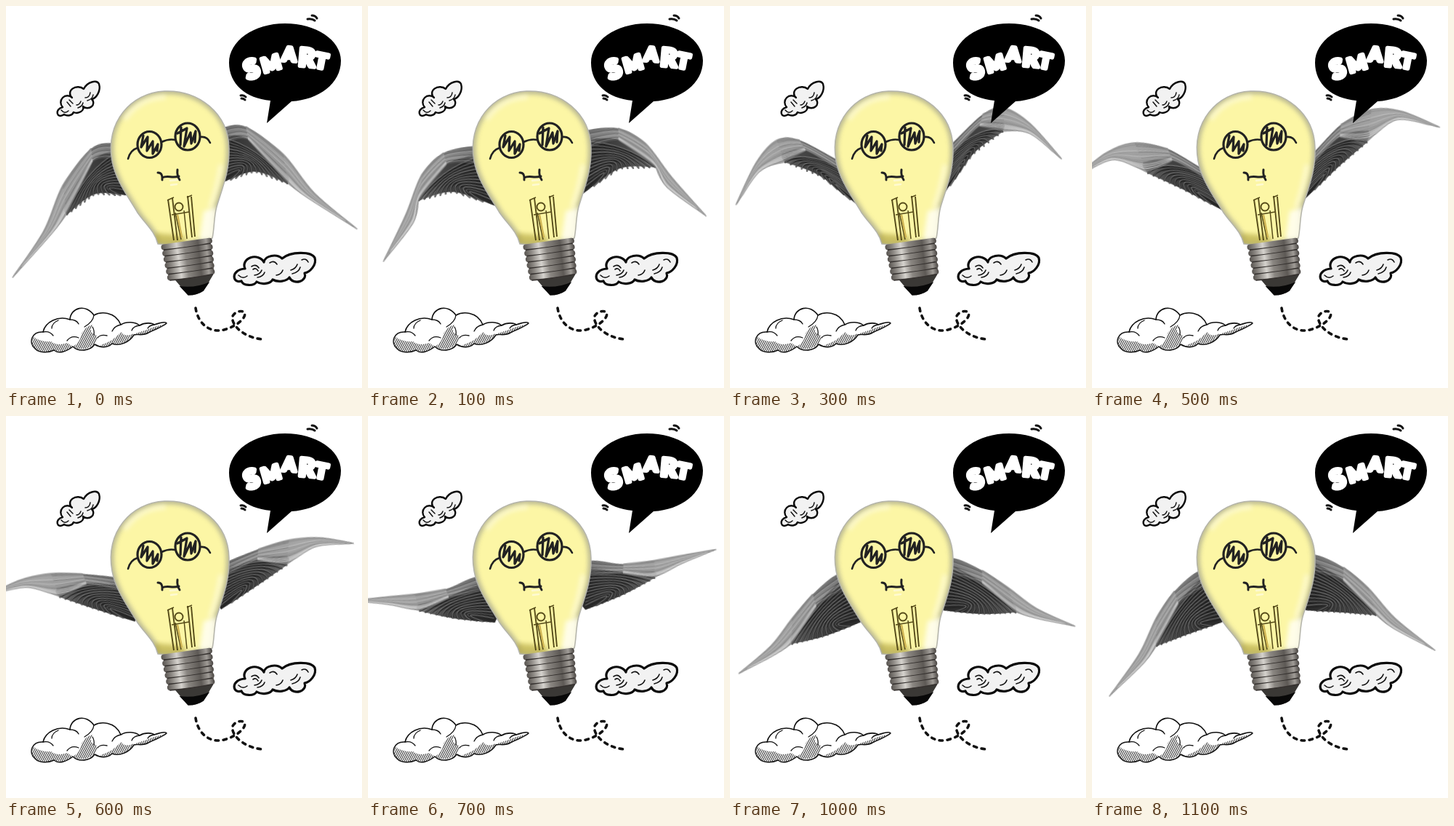
An HTML page that plays this animation: 490x525 px, repeating every 1.2 s.

```html
<!DOCTYPE html>
<html lang="en">
<head>
<meta charset="utf-8">
<title>Smart bulb</title>
<style>
  html, body { margin: 0; width: 100%; height: 100%; overflow: hidden; background: #fff; }
  svg { display: block; width: 490px; height: 525px; overflow: hidden; }
  .ink { fill: none; stroke: #111; stroke-linecap: round; stroke-linejoin: round; }
  .puff { fill: #f2f2f2; stroke: #0a0a0a; stroke-linejoin: round; }
  .word { font-family: Lato, "Open Sans", sans-serif; font-weight: 900;
          fill: #fff; stroke: #fff; stroke-width: 5.5; stroke-linejoin: round; }
  #strip { animation: flap 1.2s steps(12) infinite; }
  @keyframes flap { to { transform: translateX(-7200px); } }
</style>
</head>
<body>
<svg viewBox="0 0 490 525">
  <defs>
    <linearGradient id="plume" gradientUnits="userSpaceOnUse" x1="75" y1="0" x2="245" y2="0">
      <stop offset="0" stop-color="#6c6c6c"/><stop offset=".4" stop-color="#9c9c9c"/>
      <stop offset="1" stop-color="#c2c2c2"/>
    </linearGradient>
    <linearGradient id="shade" gradientUnits="userSpaceOnUse" x1="70" y1="0" x2="165" y2="0">
      <stop offset="0" stop-color="#2c2c2c"/><stop offset=".6" stop-color="#464646"/>
      <stop offset="1" stop-color="#808080"/>
    </linearGradient>
    <linearGradient id="metal">
      <stop offset="0" stop-color="#57534f"/><stop offset=".14" stop-color="#8d8984"/>
      <stop offset=".3" stop-color="#d6d3ce"/><stop offset=".45" stop-color="#8b8782"/>
      <stop offset=".72" stop-color="#5d5955"/><stop offset=".88" stop-color="#a09c97"/>
      <stop offset="1" stop-color="#46423f"/>
    </linearGradient>
    <pattern id="hatch" width="2.4" height="2.4" patternUnits="userSpaceOnUse" patternTransform="rotate(28)">
      <path d="M0 0V3" stroke="#222" stroke-width="1.9"/>
    </pattern>
    <filter id="soft" x="-30%" y="-30%" width="160%" height="160%"><feGaussianBlur stdDeviation="3"/></filter>
    <path id="bulb" d="M209 327C205 310 193 301 181 284C168 262 151 240 146 213C136 160 172 119 218 117C266 115 306 148 307 195C308 228 297 252 290 276C286 290 287 305 284 319Q248 333 209 327Z"/>
    <clipPath id="inBulb"><use href="#bulb"/></clipPath>
  </defs>

  <g id="strip"></g>

  <!-- bulb -->
  <use href="#bulb" fill="#fcf6a5"/>
  <g clip-path="url(#inBulb)">
    <use href="#bulb" fill="none" stroke="#a3a38c" stroke-width="7" opacity=".85" filter="url(#soft)"/>
    <path d="M163 156Q183 126 220 125M296 218Q291 250 281 277" fill="none" stroke="#fffdec" stroke-width="6" opacity=".6" filter="url(#soft)"/>
    <path d="M272 282L290 276V322H266Z" fill="#fffef0" opacity=".9" filter="url(#soft)"/>
    <path d="M204 312Q224 314 246 316V328H205Z" fill="#b3a640" opacity=".65" filter="url(#soft)"/>
  </g>
  <use href="#bulb" fill="none" stroke="#b4b4aa" stroke-width="1.5"/>
  <g fill="none" stroke="#544a18" stroke-width="1.9">
    <path d="M223 266L231 322M229 264L236 322M250 261L256 318M255 262L260 317"/>
    <path d="M233 284L241 321M245 281L249 320M228 287L252 283M222 267L231 263M249 263L256 260" stroke-width="1.5"/>
    <circle cx="238" cy="276" r="5.5"/>
    <path d="M236 287L242 318" stroke="#cfb452" stroke-width="2.5"/>
  </g>
  <path d="M226 240l10-1m-9 7l8-1" stroke="#fffce6" stroke-width="2.5" stroke-linecap="round" opacity=".7"/>

  <g id="cap" transform="translate(250.5 340) rotate(-8)">
    <path d="M-23 33L-8 57Q4 59 14 54L31 33Z" fill="#3a3835"/>
    <path d="M-18 43L-8 57Q4 59 14 54L24 43Q4 49 -18 43Z" fill="#080808"/>
  </g>

  <!-- face -->
  <g class="ink" stroke-width="3.2" style="stroke:#222">
    <ellipse cx="197.500" cy="190.500" rx="16.500" ry="18"/>
    <ellipse cx="250" cy="179.500" rx="17" ry="18.500"/>
    <path d="M214 187Q224 182 233 184M168 210Q171 198 181 195M268 180Q277 179 281 188" stroke-width="2.6"/>
    <path d="M189 178L186 194L195 180L194 199L202 186L202 203L209 190L208 199M241 167L240 191M236 175L249 168L245 193L254 174L255 189L261 172L260 187" stroke-width="3.300"/>
    <path d="M209 229Q216 229 215 239M215 236C222 232 228 237 238 234M236 225Q235 233 239 239" stroke-width="3"/>
  </g>

  <!-- speech bubble -->
  <path d="M307 78C307 48 341 24 384 24C427 24 461 47 461 75C461 107 430 129 393 131L359 161L364 130C330 127 307 107 307 78Z"/>
  <g class="word">
    <text font-size="36" transform="translate(333 102) rotate(-20)">S</text>
    <text font-size="27" transform="translate(355 92) rotate(-16)">M</text>
    <text font-size="26" transform="translate(380 75) rotate(4)">A</text>
    <text font-size="34" transform="translate(402 82) rotate(5)">R</text>
    <text font-size="28" transform="translate(424 84) rotate(11)">T</text>
  </g>
  <path class="ink" stroke-width="3" d="M415 18Q421 17 425 20M421 13Q426 13 428 17M323 123Q327 122 330 125M324 127Q327 127 329 129"/>

  <!-- doodle clouds -->
  <path class="puff" stroke-width="2.400" d="M80 149C70 156 66 142 78 139A8 8 0 0 1 91 126A10 8 0 0 1 107 114C112 104 125 101 128 107C131 117 124 127 118 128A8 7 0 0 1 106 138A9 7 0 0 1 93 146A8 6 0 0 1 80 149Z"/>
  <path class="ink" stroke-width="1.500" d="M76 143Q81 149 86 144M84 132L89 138M87 129L92 134M97 136Q101 136 103 131M99 140Q105 138 106 133M109 126Q115 126 116 119M112 130Q119 128 120 122"/>
  <path class="puff" stroke-width="3.200" d="M324 378C311 382 309 362 329 361A12 10 0 0 1 355 352A14 10 0 0 1 380 347C392 337 420 337 425 346C428 356 418 366 411 367A11 9 0 0 1 390 373A14 8 0 0 1 367 376A13 8 0 0 1 345 379A11 7 0 0 1 324 378Z"/>
  <path class="ink" stroke-width="1.600" d="M320 370Q326 376 332 371M338 358Q344 354 348 360M340 362Q344 359 347 364M346 373Q354 372 356 366M342 370Q350 369 352 363M363 353Q369 349 373 355M372 370Q379 369 381 363M394 368Q403 366 405 359M392 363Q399 361 401 355M407 349Q413 346 416 352"/>

  <!-- engraved cloud -->
  <path class="ink" stroke-width="1.600" style="fill:#fff" d="M40 471C30 462 36 447 51 448C54 434 72 425 88 431C89 414 110 409 121 425C130 420 150 419 158 438C166 433 178 434 184 439C192 434 202 436 204 438C210 436 220 433 221 436C216 441 205 444 196 449C188 454 180 450 176 452C170 462 156 468 146 464C140 470 130 470 122 465C116 474 100 476 92 468C82 476 72 478 66 473C58 477 46 477 40 471Z"/>
  <path fill="url(#hatch)" d="M40 471Q33 464 38 455Q48 462 62 461Q70 468 84 463L92 468Q80 478 66 473Q50 478 40 471ZM92 468Q103 462 104 450Q110 440 119 438Q113 450 124 452Q128 460 120 466Q106 476 92 468ZM130 466Q148 461 158 448Q164 456 176 450Q166 466 146 464Q138 470 130 466ZM178 450Q192 446 204 441L219 437Q206 444 196 449Q186 454 178 450Z"/>
  <path class="ink" stroke-width="1.300" d="M51 448Q60 446 65 453M72 432Q63 436 63 443M88 431Q97 431 100 437M121 425Q120 434 108 441M119 441Q122 446 121 452M158 438Q149 440 146 447M184 439Q175 440 173 446M204 438Q197 439 195 443M100 456Q90 452 84 460M139 453Q130 451 126 456"/>

  <path class="ink" stroke-width="3.600" stroke-dasharray="4.500 6.500" d="M261 415C264 436 280 450 300 445C318 440 332 428 328 421C322 416 308 424 312 432C316 446 336 458 356 458"/>
</svg>

<script>
  // step, lower-edge bulge, then x,y of: root, wrist, knuckle, mid, tip, under-mid, inner end, under-root
  const poses = [
    [0, -16, 74, -62, 108, -59, 153, -15, 188, 44, 239, 101, 174, 46, 153, 26, 62, 13],
    [1, -16, 76, -58, 122, -55, 155, -30, 185, 22, 224, 81, 176, 34, 164, 5, 61, 27],
    [3, -14, 77, -38, 128, -74, 158, -78, 190, -52, 226, 2, 188, -38, 151, -46, 54, 33],
    [5, -4, 78, -28, 121, -61, 164, -75, 205, -67, 254, -38, 198, -56, 152, -31, 57, 34],
    [7, 2, 78, -30, 124, -19, 166, -18, 212, -20, 252, -21, 202, -8, 163, 6, 63, 36],
    [8, 12, 79, -24, 119, -2, 157, 19, 197, 25, 248, 18, 193, 38, 162, 46, 56, 36],
    [11, 0, 77, -39, 118, -15, 147, 17, 178, 64, 226, 115, 172, 76, 152, 56, 58, 36]
  ];
  const STEPS = 12;

  const lerp = (a, b, k) => a + (b - a) * k;
  const mix = (p, q, k) => [lerp(p[0], q[0], k), lerp(p[1], q[1], k)];
  const shift = (p, x, y) => [p[0] + x, p[1] + y];
  const at = p => p.map(v => v.toFixed(1)).join(' ');
  const grey = v => `rgb(${[v, v, v].map(Math.round)})`;

  function seeded(seed) {
    return () => (seed = (seed * 16807) % 2147483647) / 2147483647;
  }

  // Smooth curve through the points
  function curve(pts) {
    return pts.slice(1).reduce((d, p, i) => {
      const o = pts[i], before = pts[i - 1] || o, after = pts[i + 2] || p;
      const c1 = shift(o, (p[0] - before[0]) / 6, (p[1] - before[1]) / 6);
      const c2 = shift(p, (o[0] - after[0]) / 6, (o[1] - after[1]) / 6);
      return `${d}C${at(c1)} ${at(c2)} ${at(p)}`;
    }, 'M' + at(pts[0]));
  }
  const join = d => 'L' + d.slice(1);

  // Point on a three-point polyline
  const along = (p, q, r, s) => s < .5 ? mix(p, q, s * 2) : mix(q, r, s * 2 - 1);

  const line = (d, tone, width, alpha = 1) =>
    `<path d="${d}" fill="none" stroke="${grey(tone)}" stroke-width="${width.toFixed(1)}" stroke-opacity="${alpha}" stroke-linecap="round"/>`;

  function poseAt(step) {
    const i = poses.findLastIndex(p => p[0] <= step);
    const from = poses[i], to = poses[(i + 1) % poses.length];
    const end = to[0] || STEPS;
    const k = (step - from[0]) / (end - from[0]);
    return from.map((v, j) => lerp(v, to[j], k)).slice(1);
  }

  function wing([bulge, ...xy]) {
    const rand = seeded(4217);
    const [a, b, c, m, t, q, e, f] = Array.from({ length: 8 }, (_, i) => xy.slice(i * 2, i * 2 + 2));
    const lobe = shift(mix(f, e, .5), 3, bulge);
    const inner = [46, a[1] + 12];
    const top = curve([inner, a, b, c, m, t]);
    const hem = join(curve([e, lobe, f])) + 'L40 0Z';
    let out = `<path d="${top}${join(curve([t, q, e]))}${hem}" fill="url(#plume)"/>`;

    const rim = curve([inner, mix(a, f, .14), mix(b, lobe, .28), mix(c, e, .66), e]);
    out += `<path d="${rim}${hem}" fill="url(#shade)"/>`;

    // Flight feathers sweep outwards from the root to the lower edge
    const count = 11;
    for (let i = 0; i <= count; i++) {
      const s = i / count;
      const start = mix(a, f, .2 + s * .75);
      const bend = mix(mix(b, c, .4 - s * .4), lobe, .3 + s * .5);
      const end = along(e, lobe, f, s * .85);
      const feather = y => `M${at(shift(start, 0, y))}Q${at(shift(bend, 0, y))} ${at(end)}`;
      out += line(feather(0), 26 + rand() * 14, 2.4, .8);
      out += line(feather(-3), 105 + rand() * 50, 1.2, .65);
    }
    // Coverts along the leading edge
    for (let i = 0; i < 10; i++) {
      const k = .02 + i * .03;
      out += line(curve([mix(a, f, k), mix(b, lobe, k), mix(c, e, k * 2.2)]), 80 + rand() * 100, 1.3, .65);
    }
    // Long outer plumes with frayed ends
    for (let i = 0; i < 15; i++) {
      const k = i / 14;
      const end = mix(mix(m, q, k), t, 1 - k * rand() * .55);
      out += line(curve([mix(b, lobe, k * .3), mix(c, e, k * .9), mix(m, q, k), end]), 120 + rand() * 100, 1 + rand() * 1.2, .65);
    }
    return out;
  }

  document.getElementById('strip').innerHTML = Array.from({ length: STEPS }, (_, i) => {
    const art = wing(poseAt(i));
    return `<g transform="translate(${232 + i * 600} 239.5) rotate(-8)"><g>${art}</g><g transform="scale(-1 1)">${art}</g></g>`;
  }).join('');

  // Screw thread
  const ridges = Array.from({ length: 6 }, (_, i) => {
    const y = -17 + i * 8.5, half = 35.5 - i * .5;
    return `<rect x="${-half}" y="${y}" width="${half * 2}" height="8" rx="4" fill="url(#metal)"/>` +
      `<path d="M${3 - half} ${y + 7.6}Q0 ${y + 9.6} ${half - 3} ${y + 7.6}" fill="none" stroke="#35312f" stroke-width="1.7"/>`;
  }).join('');
  document.getElementById('cap').insertAdjacentHTML('beforeend',
    '<path d="M-33 -12H33L32 32Q0 38 -31 32Z" fill="#55514d"/>' + ridges);
</script>
</body>
</html>
```
